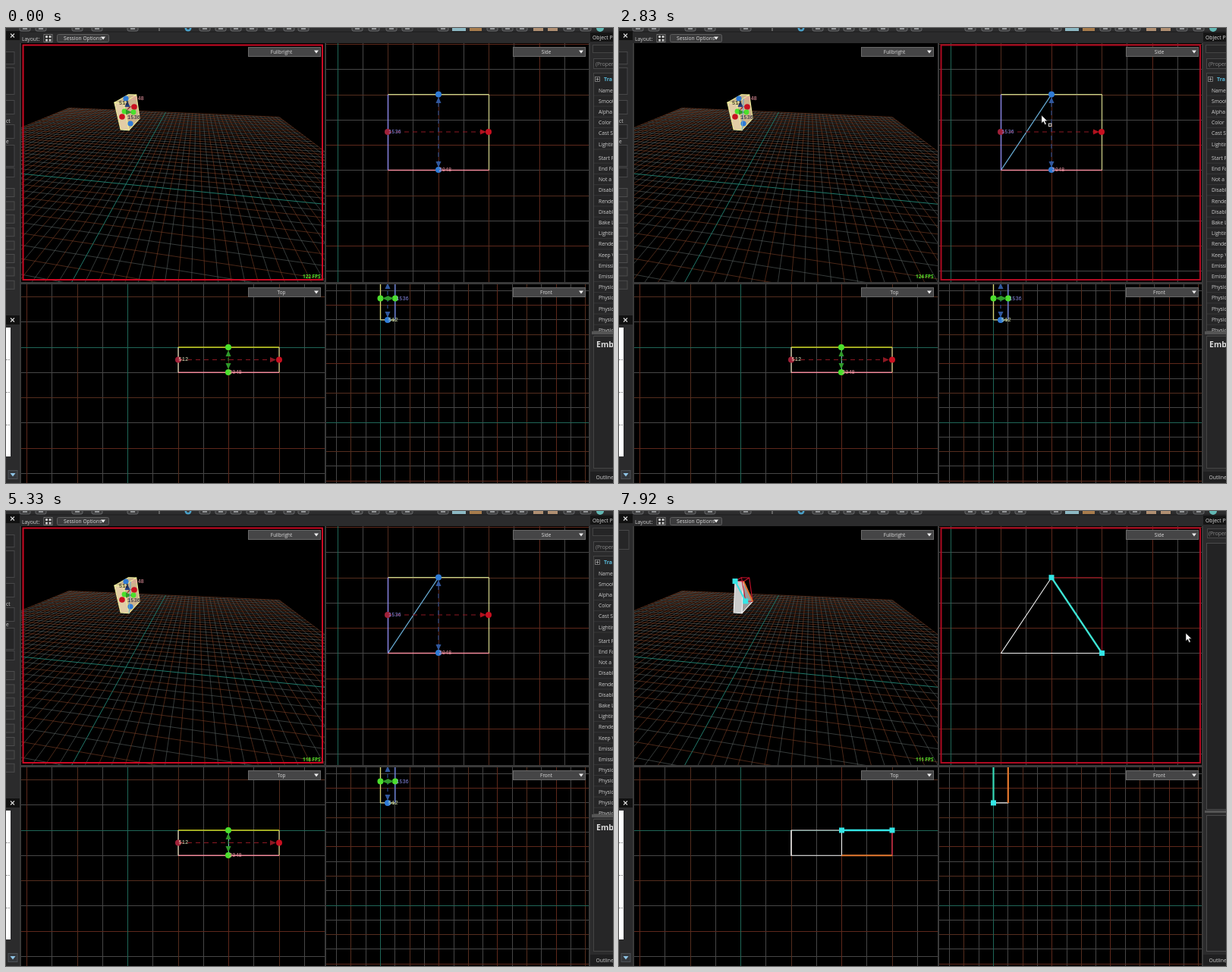
These frames come from a looping animation (800 px wide and 600 px high, 8000 ms). An HTML page:

```html
<!DOCTYPE html>
<html>
<head>
<meta charset="utf-8">
<style>
html, body { margin: 0; width: 100%; height: 100%; overflow: hidden; background: #2b2b2c; }
svg { display: block; width: 100vw; height: 100vh; }
text { font-family: "Open Sans", "Noto Sans", sans-serif; white-space: pre; }
.mono { font-family: "Liberation Mono", "DejaVu Sans Mono", monospace; }
</style>
</head>
<body>
<svg id="stage" viewBox="0 0 800 600">
  <defs>
    <clipPath id="cp"><rect x="20" y="20" width="400" height="315"/></clipPath>
    <clipPath id="cs"><rect x="422" y="20" width="346" height="315"/></clipPath>
    <clipPath id="ct"><rect x="20" y="338" width="400" height="262"/></clipPath>
    <clipPath id="cf"><rect x="422" y="338" width="346" height="262"/></clipPath>
  </defs>
  <g id="base"></g><g id="live"></g><g id="menus"></g><g id="mouse"></g>
</svg>
<script>
(() => {
const $ = id => document.getElementById(id);
const LOOP = 8000, CELL = 33.25, SMALL = 19.3;
const GRAY = '#464646', BROWN = '#542d1e', RUST = '#5e281b', TEAL = '#1f6657';
const RED = '#c8102a', BLUE = '#2f7bd6', GREEN = '#4be02c', CYAN = '#34e6e6', ORANGE = '#e0742a';
const FULL = [[2, 7], [2, 10], [6, 10], [6, 7]];

// svg string helpers
const rect = (x, y, w, h, fill, stroke = 'none', sw = 1) =>
  `<rect x="${x}" y="${y}" width="${w}" height="${h}" fill="${fill}" stroke="${stroke}" stroke-width="${sw}"/>`;
const text = (x, y, s, size = 6.6, fill = '#cfcfcf', extra = '') =>
  `<text x="${x}" y="${y}" font-size="${size}" fill="${fill}" ${extra}>${s}</text>`;
const mono = (x, y, s, fill) => text(x, y + 2.3, s, 7, fill, 'class="mono"');
const d = pts => 'M' + pts.map(p => p[0].toFixed(2) + ' ' + p[1].toFixed(2)).join('L');
const poly = (pts, stroke, fill = 'none', sw = 1.1) =>
  `<path d="${d(pts)}Z" fill="${fill}" stroke="${stroke}" stroke-width="${sw}" stroke-linejoin="round"/>`;
const line = (a, b, stroke, sw = 1.2, extra = '') =>
  `<path d="${d([a, b])}" stroke="${stroke}" stroke-width="${sw}" ${extra}/>`;
const dot = (x, y, fill, r = 4) => `<circle cx="${x}" cy="${y}" r="${r}" fill="${fill}"/>`;
const knob = p => rect(p[0] - 3.5, p[1] - 3.5, 7, 7, CYAN);
const tri = (x, y, dx, dy, fill) => poly([[x + dx * 4, y + dy * 4],
  [x - dx * 4 + dy * 3.5, y - dy * 4 + dx * 3.5], [x - dx * 4 - dy * 3.5, y - dy * 4 - dx * 3.5]], 'none', fill);
const inside = (clip, s) => `<g clip-path="url(#${clip})" fill="none">${s}</g>`;

// views: x, y, z are in grid cells
const side = (x, z) => [437 + CELL * x, 420.2 - CELL * z];
const plan = (x, y) => [160.5 + CELL * x, 421 + CELL * y];
const front = (y, z) => [493.5 + SMALL * y, 520 - SMALL * z];
function cam(x, y, z) {
  const dv = .0396 * x, du = -.00559 * y, h = z * 1.03;
  const w = 1 + dv + du - .0299 * h;
  return [(158 + 252 * dv - 1533 * du - 6.58 * h) / w, (206 + 36 * (dv + du) - 12.91 * h) / w];
}

const tone = i => i === 0 ? TEAL : i % 2 ? GRAY : i % 4 ? BROWN : RUST;
const rank = i => i === 0 ? 2 : i % 2 ? 0 : 1;
const layered = rows => rows.sort((a, b) => a[0] - b[0]).map(r => r[1]).join('');
function flatGrid(x0, y0, x1, y1, ox, oy, step) {
  const rows = [];
  for (let i = -40; i <= 40; i++) {
    const x = Math.floor(ox + i * step) + .5, y = Math.floor(oy + i * step) + .5;
    if (x > x0 && x < x1) rows.push([rank(i), line([x, y0], [x, y1], tone(i), 1)]);
    if (y > y0 && y < y1) rows.push([rank(i), line([x0, y], [x1, y], tone(i), 1)]);
  }
  return layered(rows);
}
function floorGrid() {
  const rows = [], col = i => i === 0 ? '#238070' : i % 2 ? '#59605f' : '#7a4026';
  for (let i = -32; i <= 32; i++) {
    const w = i ? .62 : .95;
    rows.push([rank(i), line(cam(-18, i, 0), cam(32, i, 0), col(i), w)]);
    if (i >= -18) rows.push([rank(i), line(cam(i, -32, 0), cam(i, 32, 0), col(i), w)]);
  }
  return layered(rows);
}

function toolbar() {
  let s = rect(0, 0, 800, 6, '#2d2d2e') + rect(0, 4.5, 800, 1, '#1c1c1d');
  for (const x of [25, 46, 94, 120, 167, 262, 283, 303, 324, 348, 373, 392, 463, 485, 508, 529, 576, 641, 661, 680, 742, 764])
    s += `<path d="M${x - 7} 0v2q0 2 2 2h10q2 0 2-2v-2" fill="#3c3c3d" stroke="#77797b" stroke-width=".8"/>` + rect(x - 3, 0, 6, 2, '#929496');
  s += dot(240, 0, '#4aa0c8', 4.5) + dot(240, 0, '#333', 2) + rect(588, 0, 18, 4, '#8db9c4') + rect(611, 0, 16, 4, '#a87c4c');
  s += rect(695, 0, 13, 4, '#b08f72') + rect(714, 0, 13, 4, '#b08f72') + dot(783, 0, '#62b8b4', 5);
  return s + line([202, 0], [202, 4], '#888');
}
const cross = y => rect(0, y - 6, 18, 12, '#111') +
  `<path d="M6 ${y - 2.5}l5 5m0-5l-5 5" stroke="#ddd" stroke-width="1.1"/>`;
function dropdown(x, y, s) {
  return rect(x + .5, y + .5, 95, 12, '#454546', '#696969') + text(x + 44, y + 9, s, 6.4, '#ddd', 'text-anchor="middle"') +
    `<path d="M${x + 87} ${y + 4.5}h6l-3 4z" fill="#eee"/>`;
}
function chrome() {
  let s = rect(0, 0, 800, 600, '#2b2b2c') + toolbar() + rect(18, 20, 752, 580, '#3a3a3a');
  s += text(21, 16.5, 'Layout:', 6.8) + rect(50, 8.5, 11, 10, '#1c1c1c', '#777') +
    rect(52, 10, 3, 3, '#ccc') + rect(56.5, 10, 3, 3, '#ccc') + rect(52, 14.5, 3, 3, '#ccc') + rect(56.5, 14.5, 3, 3, '#ccc');
  s += '<rect x="67.5" y="8.5" width="68" height="10" rx="2" fill="#3b3b3c" stroke="#5e5e5e"/>' +
    text(76, 16.3, 'Session Options', 6.7, '#ddd') + '<path d="M125 11.5h6l-3 4z" fill="#eee"/>';
  s += rect(20, 20, 400, 315, '#000') + rect(422, 20, 346, 315, '#000') + rect(20, 338, 400, 262, '#000') + rect(422, 338, 346, 262, '#000');
  s += inside('cp', floorGrid());
  s += inside('cs', flatGrid(422, 20, 768, 335, 437, 420.5, CELL));
  s += inside('ct', flatGrid(20, 338, 420, 600, 160.5, 421, CELL));
  s += inside('cf', flatGrid(422, 338, 768, 600, 493.5, 520, SMALL));
  s += cross(10) + cross(385) + rect(0, 395, 6, 170, '#fff');
  for (const y of [437, 480, 523]) s += line([0, y + .5], [6, y + .5], '#999', 1, 'stroke-dasharray="2 1"');
  s += rect(3, 583.5, 12, 11, '#34373b', '#4c5055') + '<path d="M5.5 587h7l-3.5 4.5z" fill="#8fc4e6"/>';
  s += rect(770, 6, 30, 12, '#151515') + text(773, 14.5, 'Object P', 6.8, '#ddd');
  return s + rect(770, 585, 30, 15, '#1f1f20') + text(777.5, 594.5, 'Outline', 6.8);
}

const labels = 'Name,Smoot,Alpha,Color,Cast S,Lightin,Start F,End Fa,Not a,Disabl,Rende,Disabl,Bake L,Lightin,Rende,Keep V,Emissi,Emissi,Physic,Physic,Physic,Physic,Physic'.split(',');
function panels(sel) {
  if (!sel) return rect(-2, 25.5, 15, 25, '#262627', '#474748') + rect(775.5, 23.5, 30, 12, '#252526', '#474748') +
    text(777, 32, '(Proper', 6.8, '#8a8a8a') + rect(774.5, 42.5, 30, 351, '#232324', '#4a4a4b') +
    rect(772, 395, 28, 3, '#555') + rect(774.5, 401.5, 30, 179, '#232324', '#4a4a4b');
  let s = '';
  for (const [y, h] of [[31, 16], [52, 35], [95, 18], [127, 18], [154, 28], [184, 12]]) s += rect(-2, y + .5, 13, h, '#252526', '#474748');
  for (let i = 0; i < 8; i++) s += rect(-2, 211.5 + i * 17.4, 13, 11, '#303031', '#4c4c4d');
  s += text(0, 124.5, 'ct') + text(0, 151.5, 'e');
  s += rect(773.5, 22.5, 30, 10, '#252526', '#444') + rect(774.5, 40.5, 30, 13, '#252526', '#474748') + text(777, 49.5, '(Proper', 6.8, '#8a8a8a');
  s += rect(774.5, 59.5, 30, 340, '#262627', '#444') + rect(776.5, 64.5, 6, 6, 'none', '#888', .8) +
    '<path d="M777.5 67.5h4m-2-2v4" stroke="#aaa" stroke-width=".8"/>' + text(788, 70, 'Tra', 7, '#58b8d8', 'font-weight="700"');
  labels.forEach((n, i) => {
    const y = (i < 6 ? 82 : 86) + i * 14.2;
    s += line([775, y + 7], [800, y + 7], '#3a3a3b', .8) + text(781, y + 2.5, n, 6.7);
  });
  return s + rect(772, 400, 28, 4, '#555') + rect(774.5, 406.5, 30, 174, '#262627', '#444') +
    text(778, 420.5, 'Emb', 10.5, '#ddd', 'font-weight="700"');
}

// split a convex outline by line a-b
function split(shape, a, b, sign) {
  const f = p => sign * ((b[0] - a[0]) * (p[1] - a[1]) - (b[1] - a[1]) * (p[0] - a[0]));
  const out = [];
  shape.forEach((p, i) => {
    const q = shape[(i + 1) % shape.length], u = f(p), v = f(q);
    if (u <= 0) out.push(p);
    if (u * v < 0) out.push([p[0] + (q[0] - p[0]) * u / (u - v), p[1] + (q[1] - p[1]) * u / (u - v)]);
  });
  return out;
}
const area = q => q.reduce((s, p, i) => { const n = q[(i + 1) % 4]; return s + p[0] * n[1] - n[0] * p[1]; }, 0);
function solid(shape, sel) {
  const edge = sel ? '#eeee9a' : '#f2f2f2';
  let s = '';
  shape.forEach((p, i) => {
    const n = shape[(i + 1) % shape.length];
    const q = [cam(p[0], 0, p[1]), cam(n[0], 0, n[1]), cam(n[0], 1, n[1]), cam(p[0], 1, p[1])];
    if (area(q) > 0) s += poly(q, edge, n[1] === p[1] ? (sel ? '#c8b48c' : '#aaa') : (sel ? '#e2cda6' : '#cbcbcb'));
  });
  return s + poly(shape.map(p => cam(p[0], 1, p[1])), edge, sel ? '#cdb38c' : '#9a9a9a');
}
function wire(shape) {
  return poly(shape.map(p => cam(p[0], 0, p[1])), RED) + poly(shape.map(p => cam(p[0], 1, p[1])), RED) +
    shape.map(p => line(cam(p[0], 0, p[1]), cam(p[0], 1, p[1]), RED, 1)).join('');
}
function shapeViews(shape) {
  return {
    s: poly(shape.map(p => side(...p)), '#f0f0f0'),
    t: poly([plan(2, 0), plan(6, 0), plan(6, 1), plan(2, 1)], '#f0f0f0') +
      shape.map(p => line(plan(p[0], 0), plan(p[0], 1), '#f0f0f0', 1.1)).join(''),
    f: poly([front(0, 7), front(0, 10), front(1, 10), front(1, 7)], '#f0f0f0')
  };
}
function gizmo(cutDone) {
  const A = side(2, 7), B = side(2, 10), C = side(6, 10), D = side(6, 7);
  const dash = 'stroke-dasharray="6 5"';
  let p = '', s = '', t = '', f = '';
  if (cutDone) s += line(A, side(4, 10), '#68acd4', 1.2);
  s += line(B, C, '#c4d488') + line(C, D, '#d4d48a') + line(A, D, '#f28a9c', 1.4) + line(A, B, '#8c88e8', 1.4);
  s += line([503, 137], [628, 137], '#8c1822', 1.2, dash) + line([570, 98], [570, 176], '#2b4a86', 1.2, dash);
  s += tri(629, 137, 1, 0, '#b0121e') + tri(570, 95, 0, -1, '#31589e') + tri(570, 180, 0, 1, '#31589e');
  s += dot(503, 137, '#a02038') + dot(636, 137, '#c81020') + dot(570, 87.5, BLUE) + dot(570, 187, BLUE);
  s += mono(504, 137, '1536', '#8b8be6') + mono(570.5, 187, '2048', '#f49aa8');

  t += line(plan(2, 0), plan(6, 0), '#d2d21c', 1.4) + line(plan(6, 0), plan(6, 1), '#e0d890') +
    line(plan(2, 1), plan(6, 1), '#f28a9c', 1.4) + line(plan(2, 0), plan(2, 1), '#e8e8c8');
  if (cutDone) t += line(plan(4, 0), plan(4, 1), '#8cc8d8', 1);
  t += line([228, 437.5], [352, 437.5], '#8c1822', 1.2, dash) + line([293, 428], [293, 447], '#287828', 1.2, 'stroke-dasharray="4 3"');
  t += tri(352, 437.5, 1, 0, '#8c1822') + tri(293, 429, 0, -1, '#2f9a2a') + tri(293, 446, 0, 1, '#2f9a2a');
  t += dot(227, 437.5, '#a02038') + dot(360, 437.5, '#c81020') + dot(293, 421, GREEN) + dot(293, 454, GREEN);
  t += mono(227.5, 437, '512', '#e4e8c0') + mono(294, 454, '2048', '#f49aa8');

  f += line(front(0, 7), front(0, 10), '#d6d678', 1.4) + line(front(1, 7), front(1, 10), '#7088e0', 1.4) + line(front(0, 7), front(1, 7), '#dce0a0');
  f += line([503, 338], [503, 378], '#2b4a86', 1.2, 'stroke-dasharray="5 4"') + tri(503, 340, 0, -1, '#31589e') + tri(503, 378, 0, 1, '#31589e');
  f += dot(493.5, 356.5, GREEN) + dot(513, 356.5, GREEN) + tri(500, 356.5, -1, 0, '#2f9a2a') + tri(507, 356.5, 1, 0, '#2f9a2a') + dot(503, 385, BLUE);
  f += mono(514, 357, '1536', '#8b8be6') + mono(504, 385, '512', '#d8e8b0');

  p += dot(158, 93, BLUE, 3.6) + dot(164, 126, BLUE, 3.6) + dot(153, 117, '#c81020', 3.8) + dot(169, 104, '#c81020', 3.8) +
    dot(156, 110, GREEN, 3.4) + dot(168, 111, GREEN, 3.4) + tri(163, 105, .8, -.6, '#8c1822') + tri(162, 111, 1, 0, '#2f9a2a') + tri(160, 100, 0, -1, '#243c78');
  if (cutDone) p += line(cam(2, 1, 7), cam(4, 1, 10), '#68acd4', 1);
  p += mono(165, 93, '2048', '#f49aa8') + mono(149, 99, '512', '#15180c') + mono(160, 118, '1536', '#161838');
  return { p, s, t, f };
}

// pointer keys: time, x, y
const keys = [[1000, 421, 150], [1350, 503, 187], [1450, 503, 187], [1950, 570, 93], [2650, 570, 93], [3000, 545, 135], [3450, 433, 152], [3560, 433, 152], [3750, 405, 150],
  [5900, 425, 112], [6180, 573, 90], [6380, 573, 90], [6950, 636, 187], [7200, 636, 187], [7700, 747, 161], [8001, 747, 161]];
function pointer(t) {
  if (t < 1000 || (t > 3750 && t < 5900)) return null;
  const i = keys.findIndex(k => k[0] > t) - 1, a = keys[i], b = keys[i + 1];
  let k = (t - a[0]) / (b[0] - a[0]);
  k = k * k * (3 - 2 * k);
  return [a[1] + (b[1] - a[1]) * k, a[2] + (b[2] - a[2]) * k];
}
function cursor([x, y], moving, sel) {
  const at = s => `<g transform="translate(${x.toFixed(1)} ${y.toFixed(1)})">${s}</g>`;
  if (moving) return at('<path d="M0-6.5l3 3h-2v2.500h2.500v-2l3 3-3 3v-2h-2.500v2.500h2l-3 3-3-3h2v-2.500h-2.500v2l-3-3 3-3v2h2.500v-2.500h-2z" fill="#fff" stroke="#111" stroke-width=".6"/>');
  return at('<path d="M0 0V10.5L2.5 8.2L4.4 12.4L6.3 11.5L4.4 7.6H7.8Z" fill="#fff" stroke="#111" stroke-width=".6"/>' +
    (sel ? rect(9.5, 11, 3.5, 3.5, '#111', '#ddd', 1) : ''));
}

const snap = ([x, y]) => [Math.round((x - 437) / CELL * 2) / 2, Math.round((420.2 - y) / CELL * 2) / 2];
const SLANT = split(FULL, [2, 7], [4, 10], 1);
const fps = t => t < 2650 ? 122 : t < 4250 ? 124 : t < 5600 ? 118 : t < 6750 ? 123 : 111;

function scene(t, mouse) {
  const sel = t < 620 || (t >= 2650 && t < 5600);
  const sideOn = (t >= 1150 && t < 4250) || t >= 5950;
  const cutDone = t >= 2650;
  const whole = t >= 5750 ? SLANT : FULL;
  let a = null, b = null;
  if (t >= 1400 && t < 2650) { a = [2, 7]; b = t < 1950 ? snap(mouse) : [4, 10]; }
  if (t >= 6380) { a = [4, 10]; b = t < 6950 ? snap(mouse) : [6, 7]; }
  const cut = a && (a[0] !== b[0] || a[1] !== b[1]);
  const kept = cut ? split(whole, a, b, 1) : whole, gone = cut ? split(whole, a, b, -1) : [];
  let p = solid(kept, sel), { s, t: tp, f } = shapeViews(kept);

  if (sel) {
    const g = gizmo(cutDone);
    p += g.p; s = g.s; tp = g.t; f = g.f;
  }
  if (cut) {
    p += wire(gone) + line(cam(a[0], 1, a[1]), cam(b[0], 1, b[1]), ORANGE, 1.8) + line(cam(a[0], 0, a[1]), cam(b[0], 0, b[1]), CYAN, 2);
    s = poly(gone.map(q => side(...q)), '#a31226') + s + line(side(...a), side(...b), '#3ce4d4', 2.4);
    for (const q of gone) if (q[0] === 2 || q[0] === 6) tp += line(plan(q[0], 0), plan(q[0], 1), '#a31226', 1.3);
    if (b[1] > a[1]) tp += line(plan(b[0], 0), plan(b[0], 1), ORANGE, 2);
    tp += line(plan(a[0], 1), plan(b[0], 1), ORANGE, 2.2) + line(plan(a[0], 0), plan(b[0], 0), CYAN, 2.6);
    f += line(front(1, a[1]), front(1, b[1]), ORANGE, 2.2) + line(front(0, a[1]), front(0, b[1]), '#34d8b4', 2.2);
  }
  if (a) for (const q of [a, b]) {
    p += knob(cam(q[0], 0, q[1])); s += knob(side(...q)); tp += knob(plan(q[0], 0)); f += knob(front(0, q[1]));
  }
  p += text(t >= 1750 && t < 2650 ? 338 : 391, 330, fps(t) + ' FPS', 6.4, '#58e02c', 'font-weight="700"');
  const border = sideOn ? rect(424.5, 22.5, 341.5, 309.5, 'none', '#b00a22', 2) : rect(22.5, 22.5, 394.5, 309.5, 'none', '#cc0a24', 2);
  return panels(sel) + inside('cp', p) + inside('cs', s) + inside('ct', tp) + inside('cf', f) + border;
}

$('base').innerHTML = chrome();
$('menus').innerHTML = dropdown(319, 25, 'Fullbright') + dropdown(668, 25, 'Side') + dropdown(319, 342, 'Top') + dropdown(668, 342, 'Front');
let last = '';
function render() {
  const t = performance.now() % LOOP, mouse = pointer(t);
  const now = scene(t, mouse);
  if (now !== last) $('live').innerHTML = last = now;
  $('mouse').innerHTML = mouse ? cursor(mouse, (t > 1400 && t < 2650) || (t > 6380 && t < 7200), t > 2650 && t < 5600) : '';
  requestAnimationFrame(render);
}
render();
})();
</script>
</body>
</html>
```
